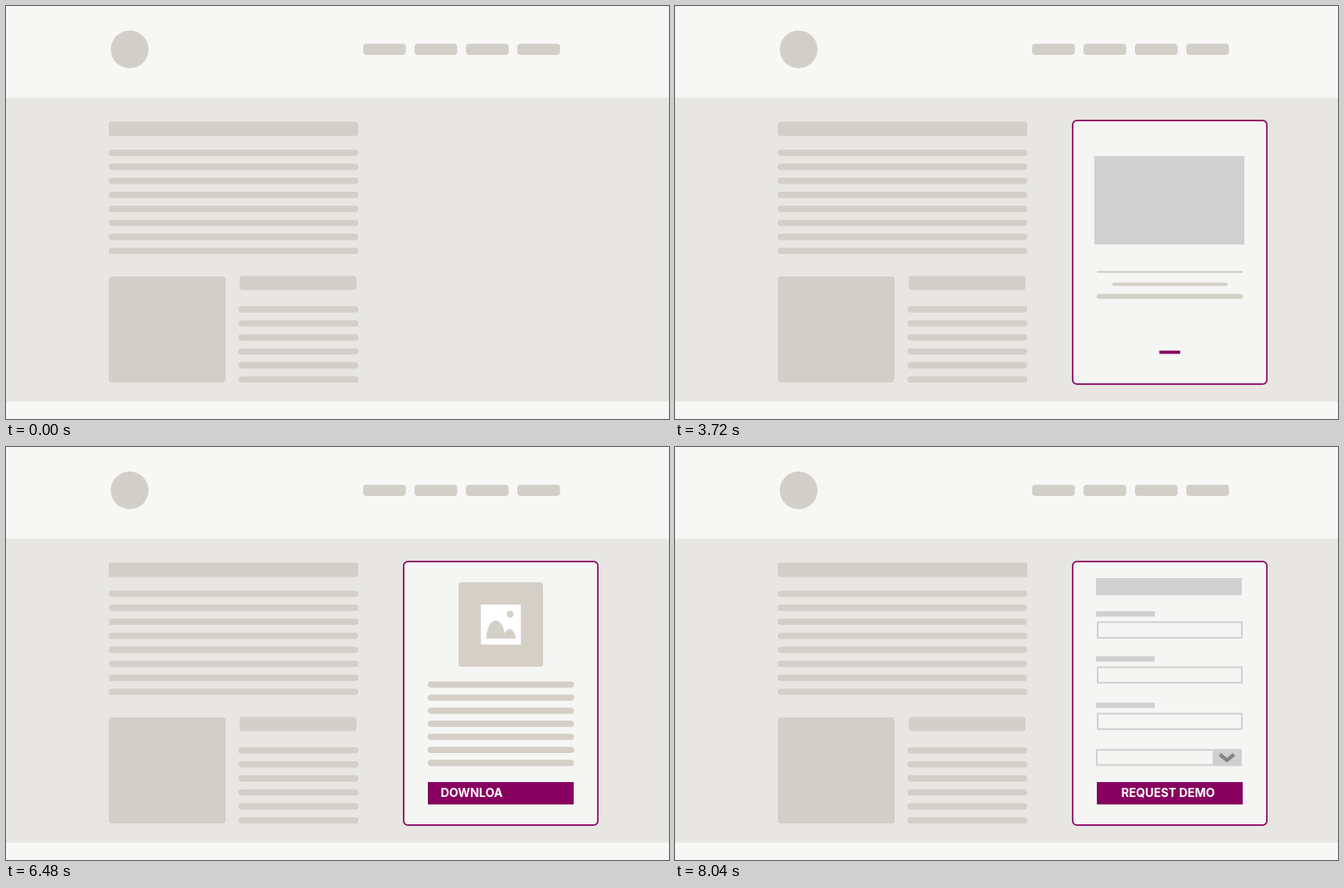
Animation of 800 by 498 pixels, one loop 9.21 s. Source, as an HTML page with a canvas:

```html
<!DOCTYPE html>
<html lang="en">
<head>
<meta charset="utf-8">
<title>Sidebar call-to-action cards</title>
<style>
  html, body { margin: 0; width: 100%; height: 100%; overflow: hidden; background: #f7f7f5; }
  canvas { display: block; width: 800px; height: 498px; }
</style>
</head>
<body>
<canvas id="stage"></canvas>
<script>
const W = 800, H = 498, LOOP = 9210, STEP = 30;
const C = {
  page: '#f7f7f5', band: '#e7e6e2', block: '#d2cfc9', card: '#f5f5f4',
  tan: '#d4d0c8', grey: '#d0d0d0', icon: '#f0f0f0', plum: '#87005f', arrow: '#858585'
};
const canvas = document.getElementById('stage');
const dpr = window.devicePixelRatio || 1;
canvas.width = W * dpr;
canvas.height = H * dpr;
const ctx = canvas.getContext('2d');

// Easing
const ramp = (t, a, b) => Math.min(1, Math.max(0, (t - a) / (b - a)));
const ease = (t, a, b) => { const p = ramp(t, a, b); return p * p * (3 - 2 * p); };
const popIn = (t, a, peak, end, over) =>
  t < peak ? over * ease(t, a, peak) : over + (1 - over) * ease(t, peak, end);
const popOut = (t, a, peak, end, over) =>
  t < peak ? 1 + (over - 1) * ease(t, a, peak) : over * (1 - ease(t, peak, end));

// Shapes
function box(x, y, w, h, r, color) {
  ctx.fillStyle = color;
  ctx.beginPath();
  ctx.roundRect(x, y, w, h, r);
  ctx.fill();
}
function frame(x, y, w, h, r, color, width) {
  ctx.strokeStyle = color;
  ctx.lineWidth = width;
  ctx.beginPath();
  ctx.roundRect(x, y, w, h, r);
  ctx.stroke();
}
function disc(x, y, r, color) {
  ctx.fillStyle = color;
  ctx.beginPath();
  ctx.arc(x, y, r, 0, Math.PI * 2);
  ctx.fill();
}
function scaled(cx, cy, s, draw) {
  if (s <= 0.001) return;
  ctx.save();
  ctx.translate(cx, cy);
  ctx.scale(s, s);
  ctx.translate(-cx, -cy);
  draw();
  ctx.restore();
}

function drawPage() {
  box(0, 0, W, H, 0, C.page);
  box(0, 110.5, W, 366.5, 0, C.band);
  disc(149.2, 52.3, 22.8, C.block);
  for (let i = 0; i < 4; i++) box(431 + 62 * i, 45.5, 51.5, 13.6, 4, C.block);
  box(124, 139.5, 301, 17.3, 3, C.block);
  for (let i = 0; i < 8; i++) box(124, 173.2 + 16.9 * i, 301, 7.6, 3.7, C.block);
  box(124, 326, 141, 128, 4, C.block);
  box(282, 325.4, 141, 17.2, 4, C.block);
  for (let i = 0; i < 6; i++) box(280.4, 362 + 16.9 * i, 144.8, 7.6, 3.7, C.block);
}

function drawPanel(s) {
  scaled(597, 297, s, () => {
    box(479.8, 138.2, 234.4, 317.6, 5, C.card);
    frame(479.8, 138.2, 234.4, 317.6, 5, C.plum, 1.7);
  });
}

// Text lines grow from their bottom edge
function drawLine(row, x, w, p) {
  if (p <= 0) return;
  const h = 7.5 * p, bottom = 290.2 + 15.75 * row;
  box(x, bottom - h, w, h, h / 2, C.tan);
}

function drawButton(card, t, out) {
  const { label, textX, textAt } = card;
  const s = out < 0 ? ease(t, textAt - 120, textAt) : 1 - ramp(out, 270, 375);
  scaled(597, 417.5, s, () => box(509, 404, 176, 27, 0, C.plum));
  const n = out < 0
    ? Math.floor((t - textAt) / STEP) + 1
    : Math.floor(label.length * (1 - ramp(out, -STEP, 270)));
  if (n <= 0) return;
  ctx.fillStyle = '#fff';
  ctx.font = '700 14.2px Inter, "Open Sans", sans-serif';
  ctx.fillText(label.slice(0, n), textX, 422.3);
}

function playIcon() {
  ctx.strokeStyle = C.icon;
  ctx.lineWidth = 4.2;
  ctx.beginPath();
  ctx.arc(596.4, 234.3, 30, 0, Math.PI * 2);
  ctx.stroke();
  ctx.fillStyle = C.icon;
  ctx.fill(new Path2D('M586.5 218 L615.3 234.7 L586.5 251.3 Z'));
}

function picture() {
  box(571, 188, 52.3, 52.3, 0, '#fff');
  disc(609.3, 200.5, 4.5, C.tan);
  ctx.fillStyle = C.tan;
  ctx.fill(new Path2D('M578 232.3 C579 218 584 209 590.5 209 C597 209 601 218 602 225.5 ' +
    'C604 222 606 220 608.5 220 C613 220 616 226 616.8 232.3 Z'));
}

function videoCard(t, out) {
  const leaving = out >= 0;
  scaled(596.5, 234.3, leaving ? popOut(out, 300, 360, 480, 1.02) : popIn(t, 105, 240, 300, 1.02),
    () => box(507.7, 182.1, 177.5, 104.4, 0, C.grey));
  scaled(596.4, 234.3, leaving ? 1 - ease(out, 90, 270) : ease(t, 285, 420), playIcon);
  for (let i = 0; i < 3; i++) {
    const p = leaving ? 1 - ramp(out, 275 + 30 * i, 395 + 30 * i) : ramp(t, 420 + 30 * i, 540 + 30 * i);
    drawLine(i + 2, i === 1 ? 527.7 : 508.8, i === 1 ? 139 : 176.6, p);
  }
}

function bookCard(t, out) {
  const leaving = out >= 0;
  scaled(597, 214, leaving ? popOut(out, 300, 360, 480, 1.03) : popIn(t, 180, 330, 390, 1.03),
    () => box(546, 163, 102, 102, 4, C.tan));
  scaled(597, 214, leaving ? 1 - ease(out, 90, 270) : ease(t, 300, 450), picture);
  for (let i = 0; i < 7; i++) {
    const p = leaving ? 1 - ramp(out, 155 + 30 * i, 275 + 30 * i) : ramp(t, 300 + 30 * i, 420 + 30 * i);
    drawLine(i, 508.8, 176.6, p);
  }
}

function formCard(t) {
  scaled(596, 168.5, ease(t, 105, 270), () => box(508, 158, 176, 20.8, 0, C.grey));
  [198, 252.2, 308.2].forEach((y, i) => {
    const start = 225 + 90 * i;
    scaled(543.5, y + 3.2, ease(t, start, start + 120), () => box(508, y, 71, 6.5, 0, C.grey));
    scaled(597, y + 22.4, ease(t, start + 30, start + 150),
      () => frame(510, y + 13.2, 174, 18.8, 0, C.grey, 2));
  });
  scaled(596, 374.5, ease(t, 495, 630), () => {
    frame(509, 365.2, 174, 18.4, 0, C.grey, 2);
    box(648.7, 364.2, 35.3, 20.4, 0, C.grey);
    ctx.strokeStyle = C.arrow;
    ctx.lineWidth = 4.4;
    ctx.stroke(new Path2D('M657.5 370.7 L666 377.6 L674.5 370.7'));
  });
}

const cards = [
  { enter: 1140, leave: 3360, textAt: 720, label: 'WATCH VIDEO', textX: 546.8, draw: videoCard },
  { enter: 3960, leave: 6360, textAt: 600, label: 'DOWNLOAD EBOOK', textX: 524.4, draw: bookCard },
  { enter: 6960, leave: Infinity, textAt: 750, label: 'REQUEST DEMO', textX: 538.4, draw: formCard }
];

function render(time) {
  ctx.setTransform(dpr, 0, 0, dpr, 0, 0);
  drawPage();
  for (const card of cards) {
    const t = time - card.enter;
    const out = time >= card.leave ? time - card.leave : -1;
    if (t < 0 || out >= 600) continue;
    drawPanel(out < 0 ? popIn(t, -30, 150, 240, 1.05) : popOut(out, 390, 450, 600, 1.05));
    card.draw(t, out);
    drawButton(card, t, out);
  }
}

const began = performance.now();
function tick() {
  const time = (performance.now() - began) % LOOP;
  render(Math.floor(time / STEP) * STEP);
  requestAnimationFrame(tick);
}
tick();
</script>
</body>
</html>
```
